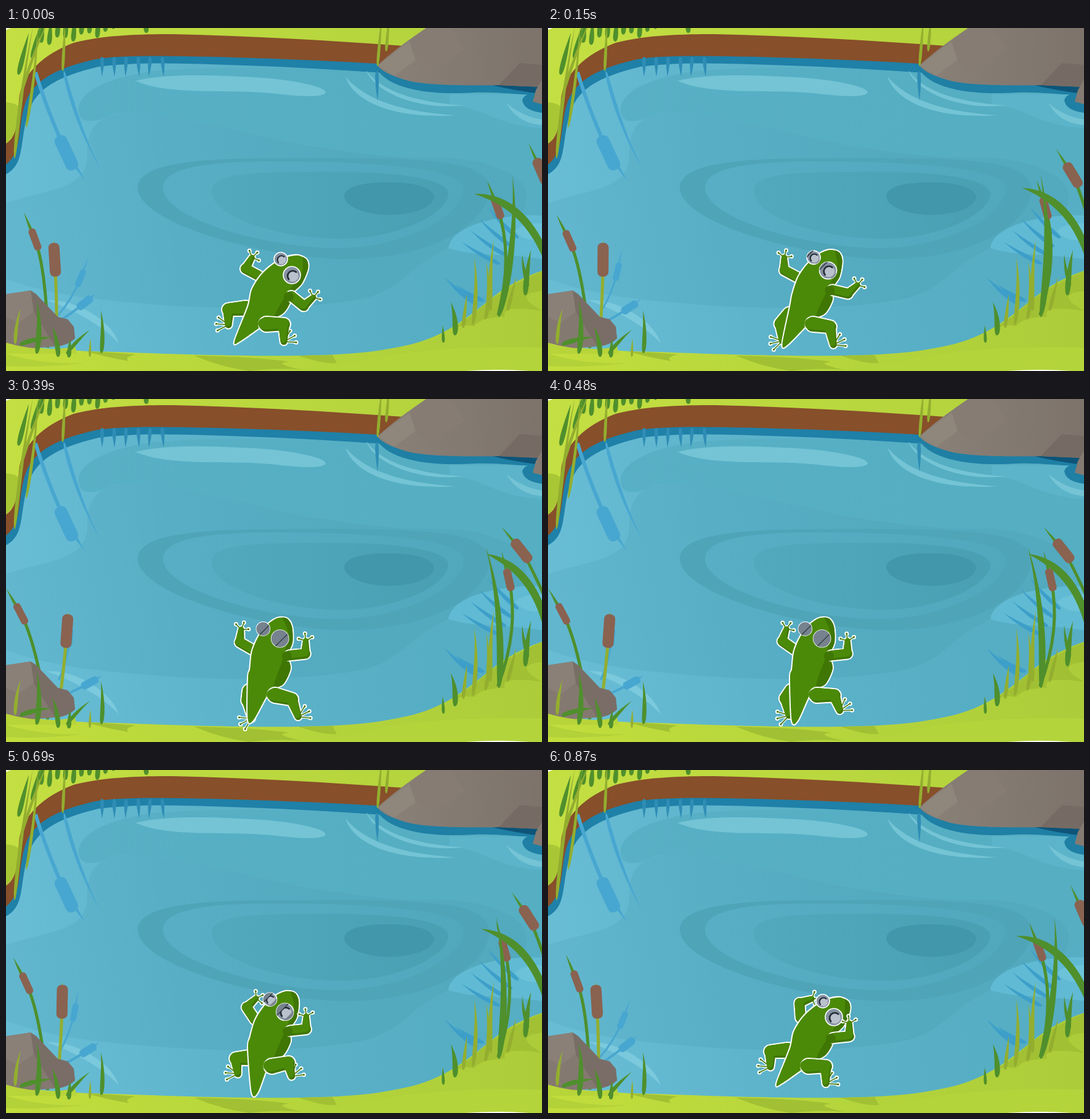
These frames come from a looping animation (870 px wide and 558 px high, 900 ms). An HTML page with a canvas:

```html
<!DOCTYPE html>
<html lang="en">
<head>
<meta charset="utf-8">
<title>Frog in a pond</title>
<style>
html, body { margin: 0; width: 870px; height: 558px; overflow: hidden; }
canvas { display: block; }
</style>
</head>
<body>
<canvas id="stage" width="870" height="558"></canvas>
<script>
const W = 870, H = 558, LOOP = 900, STEP = 30, SWING = 870;
const stage = document.getElementById('stage').getContext('2d');
const GREEN = '#4f8f2c', OLIVE = '#93ae2f', SKIN = '#4b8a08', SHADE = '#3f7604', BLUE = '#48a7d0';
const RAD = Math.PI / 180;
let g = stage;

// ---------- timing helpers ----------
const ramp = (t, a, b) => Math.min(1, Math.max(0, (t - a) / (b - a)));
const easeOut = u => Math.sin(u * Math.PI / 2);
const smooth = u => u * u * (3 - 2 * u);
const mix = (a, b, u) => a + (b - a) * u;

// ---------- drawing helpers ----------
function fill(d, color) {
  g.fillStyle = color;
  g.fill(new Path2D(d));
}

function fade(x0, y0, x1, y1, ...colors) {
  const grad = g.createLinearGradient(x0, y0, x1, y1);
  colors.forEach((c, i) => grad.addColorStop(i / (colors.length - 1), c));
  return grad;
}

// Tapered leaf from its base, wide near the base and pushed sideways by bend.
function blade(color, x, y, dx, dy, w = 8, bend = 0) {
  const len = Math.hypot(dx, dy), nx = -dy / len, ny = dx / len;
  const side = (t, off) => [x + dx * t + nx * off, y + dy * t + ny * off];
  g.beginPath();
  g.moveTo(x, y);
  g.bezierCurveTo(...side(0, w * .8), ...side(.5, bend * 1.6 + w * .5), x + dx, y + dy);
  g.bezierCurveTo(...side(.5, bend * 1.6 - w * .5), ...side(0, -w * .8), x, y);
  g.fillStyle = color;
  g.fill();
}

function cattail([tx, ty], [x, y], tilt, len, w, [cx, cy], [bx, by], color, head = '#8a6250', stem = 5) {
  blade(color, x, y, tx - x, ty - y, stem);
  g.beginPath();
  g.moveTo(x, y);
  g.quadraticCurveTo(cx, cy, bx, by);
  g.strokeStyle = color;
  g.lineWidth = stem;
  g.stroke();
  g.save();
  g.translate(x, y);
  g.rotate(tilt * RAD);
  g.beginPath();
  g.roundRect(-w / 2, -len / 2, w, len, w * .42);
  g.fillStyle = head;
  g.fill();
  g.restore();
}

function sway(x, y, degrees, draw) {
  g.save();
  g.translate(x, y);
  g.rotate(degrees * RAD);
  g.translate(-x, -y);
  draw();
  g.restore();
}

function layer(draw) {
  const canvas = document.createElement('canvas');
  canvas.width = W;
  canvas.height = H;
  g = canvas.getContext('2d');
  draw();
  g = stage;
  return canvas;
}

// ---------- still scenery ----------
const pond = layer(() => {
  g.fillStyle = fade(0, 0, W, 0, '#c4df42', '#b0d03b');
  g.fillRect(0, 0, W, H);
  fill('M0 0H8L0 3Z', '#fff');
  fill('M0 121Q14 121 24 130L22 165L0 188Z', '#a9c735');
  fill('M0 188C20 175 18 150 21 118C24 75 62 42 110 24C160 11 220 10 270 10C400 13 520 20 645 29L640 90L0 300Z', '#874f2a');
  fill('M0 222C28 200 18 160 32 120C46 82 90 62 150 50C190 45 230 45 290 46C400 48 500 52 620 59L870 70V300H0Z', '#1f80a8');
  fill('M0 238C30 222 22 190 34 145C45 100 80 80 150 63C200 57 240 57 290 58C420 61 510 66 610 73L870 108V558H0Z',
    fade(0, 160, 620, 60, '#68bdd5', '#5cb3ca', '#56aec4'));

  // depth bands
  fill('M118 135C115 105 165 80 240 70C360 60 500 65 620 74L870 108V285L845 265C820 230 760 210 700 211C640 215 560 200 470 188C370 165 260 138 195 138C160 137 165 153 130 151Q119 148 118 135Z',
    fade(110, 0, 600, 0, '#58b0c6', '#55aec2'));
  fill('M720 126C770 125 790 158 870 163V108H720Z', '#5bb4ca');
  fill('M0 285C70 260 132 265 132 205C130 165 150 139 195 138C260 138 370 165 470 188C560 203 640 214 700 211C780 211 850 240 845 275C845 330 760 335 710 362C650 390 640 430 570 442C470 460 320 458 210 447C120 440 60 430 0 408Z',
    fade(0, 330, 560, 230, '#62b7cf', '#58aec5', '#53a9be'));
  fill('M214 260C214 222 300 212 430 212C560 211 690 209 750 227Q785 240 785 264C780 320 690 378 540 376C400 370 214 315 214 260Z', '#4fa4b8');
  fill('M255 260C255 226 330 217 440 217C560 217 743 224 743 261C740 310 640 357 540 358C420 358 255 310 255 260Z',
    fade(255, 0, 740, 0, '#58aec5', '#51a7bc'));
  fill('M334 265C334 237 400 234 500 234C600 232 718 240 718 270C716 305 630 343 545 343C450 343 334 310 334 265Z',
    fade(334, 0, 720, 0, '#52a8bd', '#4a9fb2'));
  fill('M549 273C551 255 590 250 630 251C670 252 695 262 695 276C690 295 655 304 620 304C580 303 549 290 549 273Z', '#4297aa');

  // glints
  const glint = '#74c4d5';
  fill('M210 86C260 73 340 77 400 80C460 83 520 95 519 105C513 115 465 110 430 106C350 99 265 110 210 86Z', glint);
  fill('M551 79C566 125 640 148 730 142C650 137 585 120 551 79Z', glint);
  fill('M585 69C598 105 670 134 742 126C690 122 616 112 585 69Z', glint);
  fill('M812 122C828 150 850 156 870 158V149Q838 144 812 122Z', glint);
  fill('M870 305C790 302 722 325 718 358C760 372 800 365 870 376Z', '#60bad3');
  fill('M826 330Q842 316 870 318V345Q840 348 826 330Z', '#6cc3d9');
  fill('M66 443C110 440 172 475 183 513C160 487 115 460 66 443Z', '#7bc9dc');

  // reflections
  cattail([128, 247], [98, 203], -25, 60, 21, [65, 130], [48, 72], BLUE, BLUE, 6);
  blade(BLUE, 94, 70, 60, 160, 6, 8);
  for (let i = 0; i < 6; i++) blade('#2f8db5', 156 + i * 19.5, 47, 4 * Math.sin(i * 3), 32, 6);
  blade('#2f8db5', 602, 70, 1, 48, 6);
  for (let i = 0; i < 4; i++) blade('#3d9fc9', 802 + i * 10, 384 - i * 14, -62 + i * 4, -36 - i * 5, 7, -3);
  for (let i = 0; i < 2; i++) blade('#3d9fc9', 766 + i * 10, 450 - i * 6, -54 + i * 8, -45 + i * 18, 8, -4);

  // far rock
  fill('M598 60C615 98 680 110 760 105C800 103 835 110 870 108V85L620 55Z', '#1f7fa4');
  fill('M785 92H870V107Q830 103 785 92Z', '#0d5478');
  fill('M838 117C842 106 855 105 870 106V138Q840 134 838 117Z', '#1f7fa4');
  fill('M603 61C625 40 655 18 682 0H870V96L800 93C735 94 680 93 650 85Q612 74 603 61Z',
    fade(620, 0, 870, 0, '#898077', '#7d736b'));
  fill('M603 61L655 22L665 52L630 78Z', '#8f867c');
  fill('M682 0H722L745 35L690 72L665 52L655 22Z', '#867c73');
  fill('M800 93L834 57L870 60V96Z', '#756b64');
  fill('M855 120L860 101L870 84V124Z', '#857b72');

  // near bank
  fill('M0 513C50 522 110 526 180 527C300 532 400 534 480 533C560 531 600 528 660 514C720 498 755 466 790 438Q825 410 870 395V558H0Z',
    fade(0, 0, W, 0, '#c2dd3c', '#b6d63c', '#accc3a'));
  const shadow = '#a1c033';
  fill('M722 491L760 465Q800 425 870 396V428Q820 432 870 460Q800 450 810 470Q770 470 760 485Q740 480 722 491Z', shadow);
  fill('M130 526Q165 527 210 531Q190 536 200 542Q160 535 130 526Z', shadow);
  fill('M305 533Q350 552 395 558Q440 552 480 556Q430 545 460 543Q410 535 305 533Z', shadow);
  fill('M475 533Q515 547 537 545L530 532Z', shadow);
  fill('M0 530Q60 548 130 545Q60 553 0 550Z', '#b3d138');
  fill('M560 545Q680 515 870 520V558H500Z', '#b4d43c');
  fill('M745 558Q800 554 850 558Z', '#fff');

  // hanging grass
  blade(GREEN, 20, 76, 17, -68);
  blade(GREEN, 42, 50, 14, -55);
  for (let i = 0; i < 10; i++) blade(GREEN, 57 + i * 13, 24 - i * 2 + 6 * Math.sin(i * 2), 3, -40);
  blade(GREEN, 228, 8, -2, -30);
  blade(OLIVE, 14, 212, 30, -215, 6, -4);
  blade(OLIVE, 33, 162, 19, -170, 5, 4);
  blade(OLIVE, 24, 110, 46, -125, 5, -4);
  blade(OLIVE, 92, 70, 4, -80, 5);
  blade(OLIVE, 603, 62, 7, -82, 5);
  blade(OLIVE, 617, 38, 5, -58, 5);
});

const front = layer(() => {
  fill('M0 433L40 427L49 433L84 470L100 474L110 486L112 505Q100 517 80 518L30 522L0 514Z', '#847970');
  fill('M40 427L49 433L84 470L62 490L45 462Z', '#786e66');
  fill('M84 470L100 474L110 486L112 505Q100 517 80 518L62 490Z', '#7a6d67');
  fill('M0 433L40 427L45 462L20 480L0 470Z', '#8a8077');
  fill('M0 512Q60 529 112 518L115 530L0 530Z', '#b7d439');
  blade(GREEN, 50, 530, 0, -86, 9, 5);
  blade(GREEN, 85, 535, -10, -50, 8, 3);
  blade(GREEN, 102, 536, 2, -30, 7);
  blade(GREEN, 98, 530, 38, -39, 6, -2);
  blade(GREEN, 155, 529, -1, -70, 7, 3);
  blade(GREEN, 22, 515, 53, -12, 8, -3);
  blade(GREEN, 843, 435, 9, -74, 9, -2);
  blade(GREEN, 848, 420, -10, -52, 6, -3);
  blade(GREEN, 729, 500, -7, -54, 9, 4);
  blade(GREEN, 710, 512, -1, -28, 5);
  blade(OLIVE, 15, 514, 9, -58, 6, -3);
  blade(OLIVE, 136, 535, 1, -30, 4);
  blade(OLIVE, 758, 483, 2, -110, 7, 5);
  blade(OLIVE, 780, 470, -1, -90, 6, 5);
  blade(OLIVE, 787, 460, 5, -116, 7, -4);
  for (let i = 0; i < 3; i++) blade(OLIVE, 742 + i * 36, 488 - i * 14, 6 + i * 4, -55, 6);
});

function leftReeds(s) {
  sway(48, 457, -17 * s, () => cattail([134, 372], [121, 407], 22, 30, 10, [108, 440], [84, 468], BLUE, BLUE, 3));
  sway(46, 500, 10 * s, () => cattail([145, 432], [128, 447], 52, 30, 13, [105, 465], [85, 478], BLUE, BLUE, 4));
  sway(77, 522, -7.6 * s, () => cattail([29, 300], [47, 344], -20, 37, 12, [66, 395], [68, 520], GREEN));
  sway(85, 528, 7.6 * s, () => cattail([77, 345], [79, 377], -3.5, 55, 18, [83, 440], [82, 522], OLIVE));
}

function rightReeds(s) {
  sway(905, 360, -15.5 * s, () => cattail([848, 187], [869, 233], -23, 45, 17, [878, 262], [890, 345], GREEN));
  sway(796, 462, 6.3 * s, () => cattail([781, 248], [798, 293], -19, 37, 13, [824, 370], [799, 467], GREEN));
  sway(880, 378, 9.5 * s, () => fill('M760 270C800 268 850 288 884 375L874 380C850 320 815 288 760 270Z', GREEN));
  sway(800, 468, -11 * s, () => blade(GREEN, 800, 470, 22, -230, 11, 14));
}

// ---------- frog ----------
const HEAD = [[399, 426], [414, 402], [434, 384], [455, 373], [474, 370], [488, 377],
  [490, 392], [480, 416], [464, 432], [461, 447], [450, 464]];
const FLANK = [[484, 366], [480, 400], [456, 432], [436, 480], [505, 490], [510, 370]];

// Turns the upper body about the chest; the hips stay put.
function bend([x, y], s) {
  const a = -25.6 * RAD * s * ramp(y, 462, 435), cos = Math.cos(a), sin = Math.sin(a);
  const dx = x - 427, dy = y - 439;
  return [427 + dx * cos - dy * sin, 439 + dx * sin + dy * cos];
}

function blob(points) {
  const path = new Path2D(), n = points.length, at = i => points[(i + n) % n];
  path.moveTo(...points[0]);
  points.forEach((p, i) => {
    const a = at(i - 1), q = at(i + 1), b = at(i + 2);
    path.bezierCurveTo(p[0] + (q[0] - a[0]) / 7, p[1] + (q[1] - a[1]) / 7,
      q[0] - (b[0] - p[0]) / 7, q[1] - (b[1] - p[1]) / 7, ...q);
  });
  return path;
}

const polar = ([x, y], len, deg) => [x + len * Math.cos(deg * RAD), y + len * Math.sin(deg * RAD)];

function capsule(path, [x0, y0], r0, [x1, y1], r1) {
  const a = Math.atan2(y1 - y0, x1 - x0), q = Math.PI / 2, part = new Path2D();
  part.arc(x0, y0, r0, a + q, a + 3 * q);
  part.arc(x1, y1, r1, a - q, a + q);
  part.closePath();
  path.addPath(part);
}

// Two bones, each [length, direction], ending in three toes fanned around dir.
function limb(root, upper, lower, dir, { radii: [r0, r1, r2], toe, spread }) {
  const joint = polar(root, ...upper), end = polar(joint, ...lower);
  const flesh = new Path2D(), toes = new Path2D(), tips = new Path2D();
  capsule(flesh, root, r0, joint, r1);
  capsule(flesh, joint, r1 * .9, end, r2);
  for (const k of [-1, 0, 1]) {
    const tip = polar(end, toe, dir + k * spread);
    toes.moveTo(...end);
    toes.lineTo(...tip);
    tips.moveTo(...tip);
    tips.arc(...tip, 1.5, 0, 7);
  }
  g.strokeStyle = '#fff';
  g.lineWidth = 4;
  g.stroke(flesh);
  g.stroke(tips);
  g.stroke(toes);
  g.strokeStyle = g.fillStyle = SHADE;
  g.lineWidth = 1.6;
  g.stroke(toes);
  g.fill(tips);
  g.fill(flesh);
  g.save();
  g.clip(flesh);
  g.translate(-2, -3.5);
  g.fillStyle = SKIN;
  g.fill(flesh);
  g.restore();
}

function disc(x, y, r, color) {
  g.beginPath();
  g.arc(x, y, r, 0, 7);
  g.fillStyle = color;
  g.fill();
}

function eye([x, y], r, shut) {
  g.save();
  g.translate(x, y);
  g.rotate(-Math.PI / 4);
  disc(0, 0, r, '#8592a2');
  g.strokeStyle = '#fff';
  g.lineWidth = 1.6;
  g.stroke();
  g.clip();
  disc(0, r * .15, r * .66, '#b9c1cc');
  g.beginPath();
  g.arc(0, r * .15, r * .6, Math.PI * 1.03, Math.PI * 1.97);
  g.strokeStyle = '#252c33';
  g.lineWidth = r * .2;
  g.stroke();
  if (shut > .03) {
    const lid = r * (1.25 * shut - 1);
    g.fillStyle = '#76828d';
    g.fillRect(-r, -r, 2 * r, lid + r);
    g.fillRect(-r, r * (1 - .75 * shut), 2 * r, r);
    g.fillStyle = '#2b333a';
    g.fillRect(-r, lid - .6, 2 * r, 1.3);
  }
  g.restore();
}

const ARM = { radii: [8, 8, 4.5], toe: 12, spread: 66 };
const LEG = { radii: [12, 10, 5.5], toe: 20, spread: 32 };

function frog(t, s) {
  const opening = easeOut(ramp(t, 0, 270)), folding = ramp(t, 270, 870);
  const raise = easeOut(ramp(t, 0, 390)), flex = smooth(ramp(t, 270, 400));
  const kick = raise * (1 - smooth(ramp(t, 400, 590)));
  const drift = easeOut(ramp(t, 0, 690)) * (1 - smooth(ramp(t, 690, 870)));
  const shut = smooth(ramp(t, 60, 390)) * (1 - smooth(ramp(t, 570, 810)));

  const shoulder = [mix(463, 460, s), mix(436, 417, s)];
  const hip = [mix(423, 437, s), 482];
  const tail = [mix(374, 402, drift), mix(511, 526, drift)];
  const leftFore = -60 - 40 * opening + 81 * folding, rightFore = -42 - 47 * flex;
  const body = blob([...HEAD.map(p => bend(p, s)), [428, 476],
    [tail[0] + 7, tail[1] - 2], [tail[0] - 3, tail[1] - 1], [393, 453]]);

  g.lineJoin = g.lineCap = 'round';
  limb([mix(410, 400, s), mix(403, 408, s)], [24, -152 + 58 * folding ** 2], [21, leftFore], leftFore + 16, ARM);
  limb([mix(389, 396, s), mix(456, 476, s)], [mix(28, 15, s), 176 - 72 * kick], [25 + 5 * kick, 90 - 12 * s], 185 - 32 * kick, LEG);
  g.strokeStyle = '#fff';
  g.lineWidth = 4;
  g.stroke(body);
  g.fillStyle = SKIN;
  g.fill(body);
  g.save();
  g.clip(body);
  g.fillStyle = SHADE;
  g.fill(blob(FLANK.map(p => bend(p, s))));
  g.restore();
  limb(hip, [28, 33 * kick - 20 * s], [28 - 9 * s + 11 * kick, 90 - 20 * s], -28 - 18 * s + 20 * kick, LEG);
  limb(shoulder, [26, 39 - 45 * raise], [21, rightFore], rightFore - 8, ARM);
  disc(shoulder[0] - 4, shoulder[1] + 1, 8, SHADE);
  disc(hip[0] - 5, hip[1] - 1, 9, SKIN);
  eye(bend([446, 376], s), 11, shut);
  eye(bend([464, 402], s), 14, shut);
  g.lineCap = 'butt';
}

function render() {
  const t = Math.floor(performance.now() % LOOP / STEP) * STEP;
  const s = Math.sin(Math.PI * t / SWING);
  g.drawImage(pond, 0, 0);
  leftReeds(s);
  g.drawImage(front, 0, 0);
  rightReeds(s);
  frog(t, s);
  requestAnimationFrame(render);
}
render();
</script>
</body>
</html>
```
